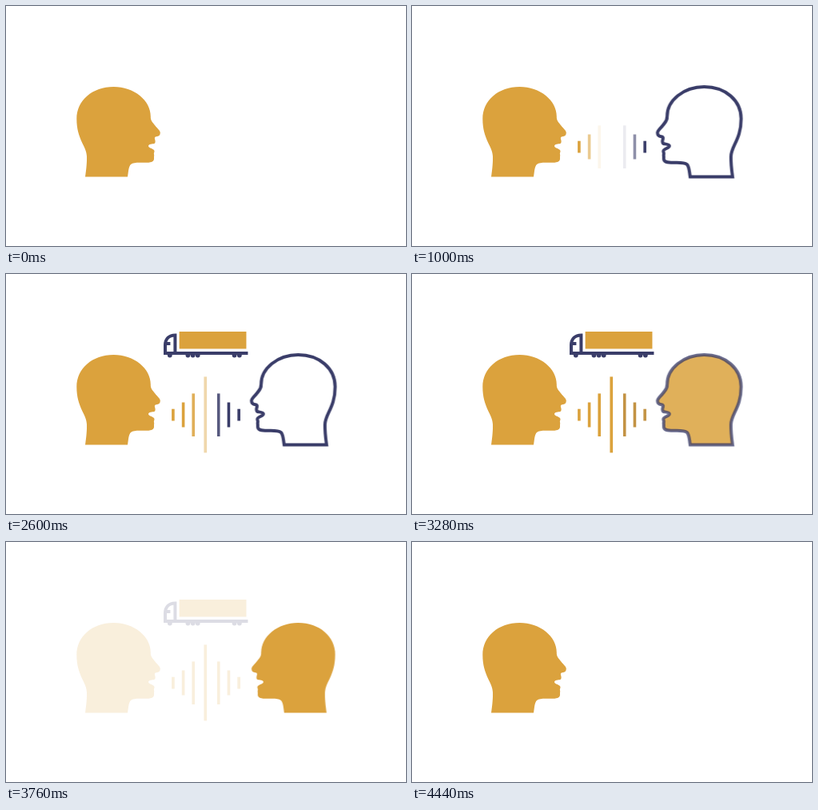
An HTML page without scripts that plays this animation: 500x300 px, repeating every 4.8 s.

```html
<!DOCTYPE html>
<html lang="en">
<head>
<meta charset="utf-8">
<title>Conversation</title>
<style>
  :root { --gold: #dba23d; --navy: #3a3d69; }
  html, body { margin: 0; width: 100%; height: 100%; overflow: hidden; background: #fff; }
  svg { display: block; width: 100%; height: 100%; }

  .scene, .bar, .right rect, .truck, .outline, .fill, .move, .flip {
    animation: 4.8s linear infinite;
  }
  .gold { fill: var(--gold); }
  .line { fill: none; stroke: var(--navy); stroke-width: 4; }
  .navy { fill: var(--navy); }

  .scene { animation-name: leave; }
  @keyframes leave { 0%, 70.83% { opacity: 1; } 80%, 100% { opacity: 0; } }

  /* Sound bars: each appears, dips and returns, from the heads inwards */
  .b1 { animation-name: b1; }
  .b2 { animation-name: b2; }
  .b3 { animation-name: b3; }
  .b4 { animation-name: b4; }
  @keyframes b1 {
    0%, 11.25%, 37.7%, 37.92% { opacity: 0; }
    19.58%, 32.5%, 46.25%, 100% { opacity: 1; }
  }
  @keyframes b2 {
    0%, 15.83%, 37.92%, 42.5% { opacity: 0; }
    24.58%, 32.92%, 50.83%, 100% { opacity: 1; }
  }
  @keyframes b3 {
    0%, 20%, 39.58%, 47.08% { opacity: 0; }
    28.33%, 34.17%, 55.42%, 100% { opacity: 1; }
  }
  @keyframes b4 {
    0%, 23.96%, 50.42% { opacity: 0; }
    32.29%, 46.88%, 59.17%, 100% { opacity: 1; }
  }
  .right rect { animation-name: recolor; }
  @keyframes recolor {
    0%, 59.17% { fill: var(--navy); }
    70%, 100% { fill: var(--gold); }
  }

  .truck { transform-origin: 249.8px 88px; animation-name: pop; }
  @keyframes pop {
    0%, 34.58% { transform: scale(0); animation-timing-function: cubic-bezier(.33, .3, .6, 1); }
    42.92% { transform: scale(1.17); animation-timing-function: ease-in-out; }
    51.67%, 100% { transform: scale(1); }
  }

  .outline { animation-name: enter; }
  @keyframes enter {
    0% { opacity: 0; transform: translateX(36px); animation-timing-function: ease-in-out; }
    10.42%, 66.25% { opacity: 1; transform: none; }
    75.2%, 100% { opacity: 0; transform: none; }
  }

  .fill { animation-name: fill; }
  @keyframes fill { 0%, 59.17% { opacity: 0; } 70%, 100% { opacity: 1; } }

  .move { animation-name: move; }
  @keyframes move {
    0%, 79.92% { transform: translateX(218.6px); animation-timing-function: ease-in-out; }
    92.42%, 100% { transform: translateX(0); }
  }
  .flip { transform-origin: 140.55px 0; animation-name: flip; }
  @keyframes flip {
    0%, 86.7% { transform: scaleX(-1); animation-timing-function: ease-in-out; }
    91.7%, 100% { transform: scaleX(1); }
  }
</style>
</head>
<body>
<svg viewBox="0 0 500 300">
  <defs>
    <path id="head" d="M99 213.5C100.5 203 101.2 196 101 188C100.8 175 88.3 167 88.3 141
      C88.3 118 108 101 134.5 101C160 101 181 118 180.8 138C180.5 143.5 183.5 145.5 186 149
      C189 153 192.8 155.5 192.8 158.5C192.8 161.5 191 163 188 163.2C186 163.4 185.6 164.5 186 166.2
      C186.8 168.5 187 171 185.5 172C183 172.6 178.2 172.5 178 175C178 178 185.5 178 185.5 181.5
      C185.5 183 184.5 184 185 185.5C185.5 187 184.8 187.5 185 190C185.3 194 183 195.5 176 195.8
      C168 196 160 194.8 156 198C153 201 153 208 152 213.5Z"/>
  </defs>

  <g class="scene">
    <use href="#head" class="gold"/>

    <g class="gold">
      <rect class="bar b1" x="207.1" y="168.7" width="3.6" height="14.8"/>
      <rect class="bar b2" x="219.8" y="160.5" width="3.6" height="31"/>
      <rect class="bar b3" x="232.4" y="149.4" width="3.6" height="53.6"/>
      <rect class="bar b4" x="247.4" y="128.4" width="3.7" height="95"/>
    </g>
    <g class="right">
      <g class="bar b3"><rect x="263.9" y="149.4" width="3.6" height="53.6"/></g>
      <g class="bar b2"><rect x="276.6" y="160.5" width="3.6" height="31"/></g>
      <g class="bar b1"><rect x="289.3" y="168.7" width="3.6" height="14.8"/></g>
    </g>

    <g class="truck">
      <rect class="gold" x="216.6" y="72" width="83.8" height="21.5"/>
      <path class="line" d="M197 99H302.4M199 99V89C199 81 204 76.4 211.4 76.4V99"/>
      <path class="line" stroke-width="3" d="M199 87H205.4"/>
      <g class="navy">
        <circle cx="204.8" cy="101.5" r="2.9"/>
        <circle cx="227.4" cy="101.5" r="2.9"/>
        <circle cx="233.6" cy="101.5" r="2.9"/>
        <circle cx="239.7" cy="101.5" r="2.9"/>
        <circle cx="285.5" cy="101.5" r="2.9"/>
        <circle cx="291.8" cy="101.5" r="2.9"/>
      </g>
    </g>
  </g>

  <g class="move">
    <g class="flip">
      <g class="fill"><use href="#head" class="gold"/></g>
    </g>
  </g>
  <g class="outline">
    <use href="#head" class="line" transform="translate(499.7 0) scale(-1 1)"/>
  </g>
</svg>
</body>
</html>
```
